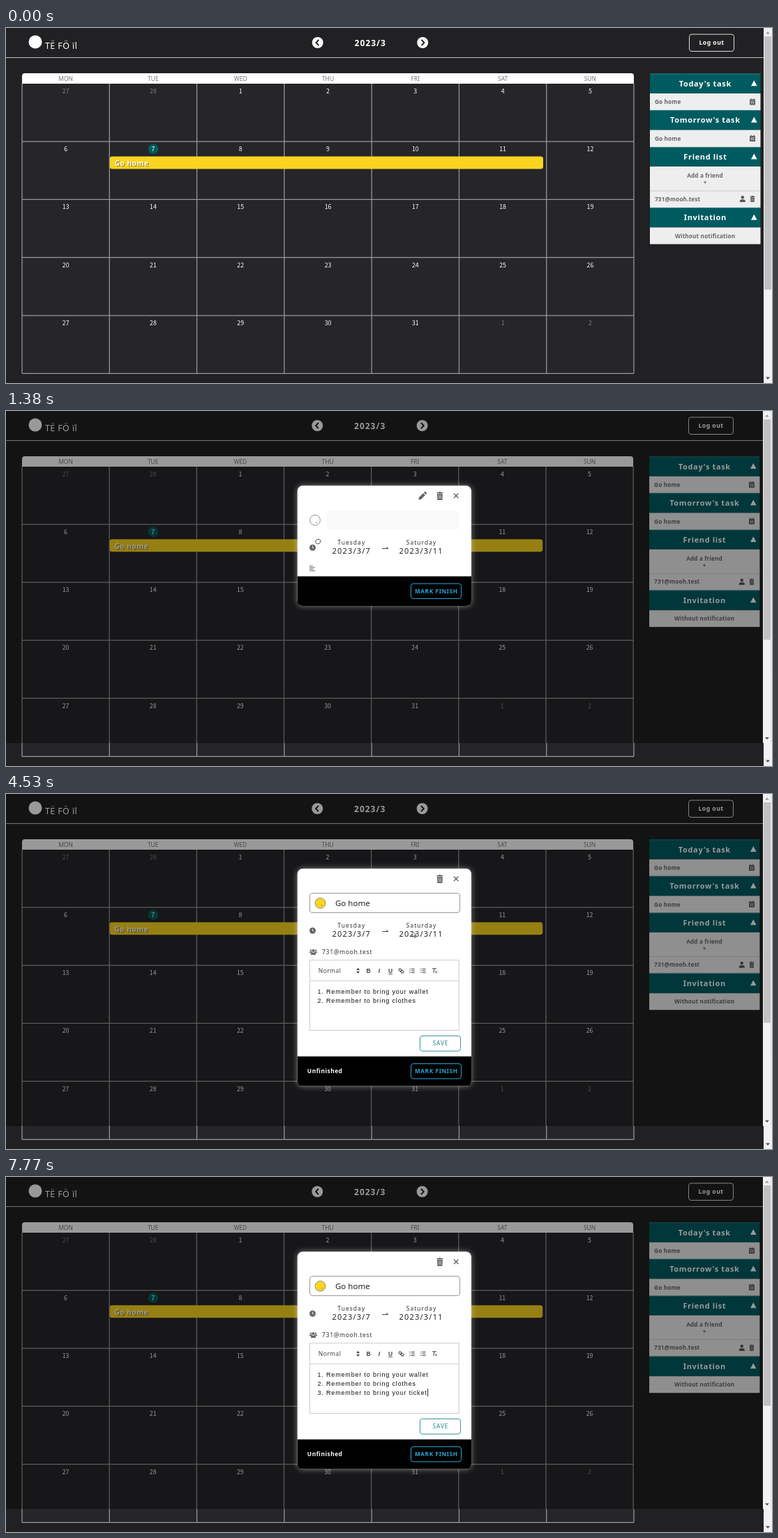
These frames come from a looping animation (1098x510 px, 8 s). An HTML page:

```html
<!DOCTYPE html>
<html lang="en">
<head>
<meta charset="utf-8">
<title>Calendar</title>
<style>
html, body { margin: 0; width: 100%; height: 100%; overflow: hidden; background: #212022; }
svg { display: block; width: 100vw; height: 100vh; font-family: "Noto Sans", sans-serif; }
.num { font-family: "Noto Sans CJK TC", "Noto Sans CJK JP", "Noto Sans", sans-serif; }
.arial { font-family: "Liberation Sans", Arial, sans-serif; }
.title { text-shadow: 1px 1px 1px #0007; }
.glow { filter: drop-shadow(0 0 4px #fbd41f) drop-shadow(0 0 3px #fbd41fa0); }
.dialog { filter: drop-shadow(0 0 4px #fff7); }
</style>
</head>
<body>
<svg id="stage" viewBox="0 0 1098 510" preserveAspectRatio="none" xmlns="http://www.w3.org/2000/svg"></svg>
<script>
const LOOP = 8000;
const MAIL = '731@mooh.test';
const stage = document.getElementById('stage');

const text = (x, y, s, size, fill, { w = 400, ls = 0, mid = false, cls = '', more = '' } = {}) =>
  `<text x="${x + (mid ? ls / 2 : 0)}" y="${y}" font-size="${size}" fill="${fill}" font-weight="${w}" letter-spacing="${ls}"` +
  `${mid ? ' text-anchor="middle"' : ''} class="${cls}" xml:space="preserve" ${more}>${s}</text>`;
const rect = (x, y, w, h, fill, rx = 0, more = '') =>
  `<rect x="${x}" y="${y}" width="${w}" height="${h}" fill="${fill}" rx="${rx}" ${more}/>`;
const circle = (x, y, r, fill, more = '') => `<circle cx="${x}" cy="${y}" r="${r}" fill="${fill}" ${more}/>`;
const path = (d, fill, more = '') => `<path d="${d}" fill="${fill}" ${more}/>`;
const line = (d, color, width = 1, more = '') => path(d, 'none', `stroke="${color}" stroke-width="${width}" ${more}`);
const box = (x, y, w, h, color, rx, fill = 'none', more = '') =>
  rect(x, y, w, h, fill, rx, `stroke="${color}" ${more}`);
const at = (x, y, s, body) => `<g transform="translate(${x} ${y}) scale(${s})">${body}</g>`;

// Icons, centred on their position
const trash = (x, y, s, c) => at(x, y, s,
  rect(-4.5, -5, 9, 1.5, c) + rect(-1.7, -6, 3.4, 1.5, c) + path('M-4 -2.8H4L3.5 6H-3.5Z', c) +
  line('M-1.7 -1V4.3M0 -1V4.3M1.7 -1V4.3', '#eee', .6));
const person = (x, y, s, c) => at(x, y, s, circle(0, -2.2, 2.2, c) + path('M-4 4.5V3Q-4 .8 0 .8T4 3V4.5Z', c));
const datebook = (x, y) => at(x, y, 1,
  rect(-4, -3.6, 8, 8, '#555', 1) + line('M-2 -4.8V-3M2 -4.8V-3', '#555', 1.2) +
  line('M-3.5 -1.3H3.5M-3.2 1.2H3.2M-1.2 -.5V3.6M1.2 -.5V3.6', '#eee', .6));
const rows = (x, y, c) => line(`M${x - 4} ${y - 3.2}h5m-5 2.2h8m-8 2.2h5m-5 2.2h8`, c, 1);

function scrollbar(height, thumbEnd) {
  return rect(1086, 0, 12, height, '#f1f1f1') + rect(1087, 12, 10, thumbEnd - 12, '#c1c1c1') +
    path('M1089 8.5h6l-3 -3.4Z', '#a0a0a0') + path(`M1089 ${height - 8.4}h6l-3 3.4Z`, '#505050');
}

const eventBar = (fill, cls = '') => rect(148.7, 184.5, 621.3, 18, fill, 3.5, `class="${cls}"`) +
  text(155.7, 198, 'Go home', 10, '#fff', { w: 600, ls: .6, cls: 'title' });

function header() {
  const nav = (x, d) => circle(x, 21, 8, '#fff') +
    line(`M${x + d * -1.6} 17l${d * 3.8} 4l${d * -3.8} 4`, '#212022', 1.9);
  return circle(42, 20, 9.5, '#fff') +
    text(56, 29.5, 'TË FÖ ïl', 12.5, '#fff', { w: 300, ls: .4 }) +
    nav(446.7, -1) + nav(597.2, 1) +
    text(521.7, 26, '2023/3', 12, '#fff', { w: 800, ls: 1, mid: true }) +
    box(979.5, 9, 64, 24.5, '#ddd', 3.5) +
    text(1011.3, 24.3, 'Log out', 8.7, '#fff', { w: 600, ls: .45, mid: true }) +
    line('M0 42.5H1086', '#c4c4c4');
}

function calendar() {
  const colW = 125.29, rowH = 83.3, left = 23, top = 79.8;
  let out = rect(left, top, colW * 7, rowH * 5, '#262528');
  let grid = '';
  for (let c = 0; c <= 7; c++) grid += `M${left + c * colW} ${top}v${rowH * 5}`;
  for (let r = 1; r <= 5; r++) grid += `M${left} ${top + r * rowH}h${colW * 7}`;
  out += line(grid, '#999', 1.25) + path('M23 80V69q0 -4 4 -4H896q4 0 4 4V80Z', '#fff');
  ['MON', 'TUE', 'WED', 'THU', 'FRI', 'SAT', 'SUN'].forEach((day, c) => {
    out += text(left + (c + .5) * colW, 75.6, day, 8.5, '#777', { mid: true });
  });
  out += circle(211, 173.8, 7.4, '#045a5d');
  for (let i = 0; i < 35; i++) {
    const n = i - 1, inMonth = n >= 1 && n <= 31;
    const label = n < 1 ? 28 + n : n > 31 ? n - 31 : n;
    out += text(left + (i % 7 + .5) * colW, 93.8 + Math.floor(i / 7) * rowH, label, 8.8,
      inMonth ? '#fff' : '#7c7c7c', { w: inMonth ? 500 : 400, mid: true, cls: 'num' });
  }
  return out + eventBar('#fad420');
}

function sidebar() {
  const x = 923, w = 158.5, mid = 1002;
  const head = (y, h, s) => rect(x, y, w, h, '#005b60') + line(`M${x} ${y + .4}h${w}`, '#2f8488', .8) +
    text(mid, y + h / 2 + 4, s, 11, '#fff', { w: 600, ls: .65, mid: true }) +
    path(`M1068 ${y + h / 2 + 3.4}h8.6l-4.3 -8Z`, '#fff');
  const item = (y, h) => rect(x, y, w, h, '#eee');
  const label = (lx, y, s, center) => text(lx, y, s, 8.2, '#666', { w: 600, ls: .15, mid: center });
  const task = y => item(y, 24.5) + label(930, y + 15.3, 'Go home') + datebook(1070, y + 12);
  return head(65.5, 28.5, "Today's task") + task(94) +
    head(118, 28.5, "Tomorrow's task") + task(146.5) +
    head(171, 28, 'Friend list') + item(199, 59) +
    label(mid, 214.8, 'Add a friend', true) + label(mid, 224.8, '+', true) +
    line(`M${x} 234h${w}`, '#ccc') + label(930, 248.5, MAIL) +
    person(1055.8, 245.5, 1, '#555') + trash(1070, 245.5, .75, '#555') +
    head(258, 28.5, 'Invitation') + item(286.5, 24) + label(mid, 301.8, 'Without notification', true);
}

// A dialog whose black footer starts at `foot`
function dialog(foot, body, { pencil = true, status = true } = {}) {
  const x = 417.7, right = 667, top = 107.3, bottom = foot + 42.6;
  const dark = { w: 400, ls: 1.1 };
  return rect(x, top, right - x, bottom - top, '#fff', 7.5, 'class="dialog"') +
    path(`M${x} ${foot}H${right}V${bottom - 7.5}q0 7.5 -7.5 7.5H${x + 7.5}q-7.5 0 -7.5 -7.5Z`, '#000') +
    (pencil ? path('M591.3 127.6l.7 -3.6 6 -6 2.9 2.9 -6 6ZM598.8 117.2l1.2 -1.2q.8 -.6 1.6 .2l1.2 1.2q.7 .8 0 1.5l-1.2 1.2Z', '#666') : '') +
    trash(621.9, 122, 1, '#666') + line('M642 118.6l6.4 6.4m0 -6.4l-6.4 6.4', '#666', 1.4) +
    circle(439.5, 196.2, 4.5, '#666') + line('M439.5 193.6v2.8l1.8 1', '#fff', .9) +
    text(475.3, 192.4, 'Tuesday', 8.4, '#333', dark) +
    text(467.5, 205, '2023/3/7', 11, '#222', { ls: 1.2 }) +
    text(573.7, 192.4, 'Saturday', 8.4, '#333', dark) +
    text(563.6, 205, '2023/3/11', 11, '#222', { ls: 1.2 }) +
    line('M539.3 197.6h8.6l-2.6 -2', '#333', 1) + body +
    (status ? text(431.8, foot + 24.4, 'Unfinished', 8.4, '#fff', { w: 600, ls: .5 }) : '') +
    box(580.5, foot + 10.5, 72, 21.5, '#2ba5d3', 3.5) +
    text(616.5, foot + 24.4, 'MARK FINISH', 8.2, '#2ba5d3', { w: 600, ls: .65, mid: true });
}

const swatch = (x, fill) => circle(x, 156.8, 7.4, fill, 'stroke="#777" stroke-width=".8"') +
  circle(x + 2, 160, .7, '#666');
const guests = person(440.5, 227, .9, '#666') + person(437, 225.8, .55, '#666') + person(444, 225.8, .55, '#666') +
  text(453, 229.6, MAIL, 8.6, '#333', { ls: .65 });
const field = rect(459, 143, 191.5, 27.5, '#f9f9f9', 8);

function loadingView() {
  return dialog(237.5, swatch(443, '#fff') + field + rows(439, 226, '#666'), { status: false });
}

function detailView() {
  const note = (y, s) => text(453, y, s, 8.6, '#333', { ls: .7 });
  return dialog(306.3, swatch(443, '#fad420') + field +
    text(465, 161, 'Go home', 11.5, '#222') + guests + rows(439, 267.2, '#666') +
    note(251.8, '1. Remember to bring your wallet') + note(270, '2. Remember to bring clothes'));
}

function editView() {
  const ink = '#444';
  const note = (y, n, s, id = ['', '']) =>
    text(446.5, y, n, 9, '#111', { ls: .83, cls: 'arial', more: id[0] }) +
    text(459, y, s, 9, '#111', { ls: .83, cls: 'arial', more: id[1] });
  const glyph = (x, s, more) => text(x, 257, s, 8.5, ink, { w: 700, mid: true, cls: 'arial', more });
  const listIcon = x => line(`M${x - 1.2} 251.4h5m-5 2.6h5m-5 2.6h5`, ink, 1) +
    line(`M${x - 3.6} 251.4h1.3m-1.3 2.6h1.3m-1.3 2.6h1.3`, ink, 1);
  const toolbar = text(447.8, 256.5, 'Normal', 8.5, ink, { ls: .4 }) +
    path('M502.2 253h4.8l-2.4 -3.2ZM502.2 254.8h4.8l-2.4 3.2Z', ink) +
    glyph(519.5, 'B') + glyph(535, 'I', 'font-style="italic" font-family="serif"') +
    glyph(551, 'U', 'text-decoration="underline"') +
    at(566.5, 254, 1, `<g transform="rotate(40)">${box(-4, -1.5, 4.4, 3, ink, 1.5) + box(-.4, -1.5, 4.4, 3, ink, 1.5)}</g>`) +
    listIcon(582) + listIcon(597.8) +
    line('M611 250.8h6m-3 0l-1.2 6.2m2.4 -2.6l2.6 2.6m0 -2.6l-2.6 2.6', ink, 1);
  return dialog(377, swatch(450.5, '#fad420') +
    box(435.5, 142.5, 215, 28, '#999', 3.5, 'none', 'id="titleBorder"') +
    text(472, 161, 'Go home', 11.5, '#222') + guests +
    box(435.5, 238.7, 213.7, 100.8, '#ccc', 0) + line('M435.5 268.2h213.7', '#ccc') + toolbar +
    note(286.8, '1.', 'Remember to bring your wallet') + note(300, '2.', 'Remember to bring clothes') +
    note(313.2, '', 'Remember to bring your ticket', ['id="marker"', 'id="ticket"']) +
    rect(0, 0, .9, 11, '#111', 0, 'id="caret"') +
    box(593.5, 347.5, 58, 21.8, '#3693a2', 3.5) +
    text(622.5, 361.4, 'SAVE', 8.2, '#24808c', { w: 500, ls: .9, mid: true }), { pencil: false });
}

const outline = 'stroke="#333" stroke-width=".8" stroke-linejoin="round"';
const cursors = {
  arrow: path('M.3 .3V9L2.2 7.2 3.5 10.2 4.8 9.6 3.5 6.7H6Z', '#fff', outline),
  hand: path('M3 7V1.2q.9 -1.4 1.8 0V5q3.8 .2 4 1.6V9.4q-.3 1.4 -1 3.2H3.6Q2.4 10.6 .6 8 1 6.6 3 8Z', '#fff', outline),
  busy: `<ellipse rx="3.7" ry="3.2" fill="#fff" ${outline} transform="rotate(-35)"/>`,
  beam: line('M-1.5 -5h3M-1.5 5h3M0 -5V5', '#333', .9)
};

stage.innerHTML = `
  <defs>
    <clipPath id="view"><rect width="1098" height="477"/></clipPath>
    <g id="page">${rect(0, 0, 1098, 510, '#212022') + header() + calendar() + sidebar()}</g>
  </defs>
  <use href="#page"/>${scrollbar(510, 376)}
  <g id="live" clip-path="url(#view)">
    <g transform="scale(.999)"><use href="#page"/><g id="hover">${eventBar('#fcd62b', 'glow')}</g>${scrollbar(477.5, 329)}</g>
    ${rect(0, 0, 1085, 477, '#000', 0, 'id="shade" opacity=".4"')}
  </g>
  <g id="loading">${loadingView()}</g><g id="detail">${detailView()}</g><g id="edit">${editView()}</g>
  ${Object.entries(cursors).map(([k, v]) => `<g id="${k}">${v}</g>`).join('')}`;

// start, shape, x, y, then optionally: end of move, x, y
const moves = [
  [180, 'arrow', 640, 330, 640, 448, 188],
  [1040, 'hand', 445.5, 187.3],
  [1380, 'busy', 447.3, 187.5],
  [1600, 'arrow', 449, 189, 2140, 608, 147],
  [2210, 'arrow', 608, 147, 2370, 598, 137],
  [2620, 'arrow', 598, 137],
  [2700, 'hand', 592, 127.3],
  [3330, 'arrow', 597, 128, 3730, 614, 190],
  [4050, 'beam', 586, 297],
  [4530, 'arrow', 582, 196.5],
  [6550, 'none', 0, 0]
];
// start, x, y, shown
const carets = [
  [0, 0, 0, false], [4600, 587.5, 291.2, true], [5160, 446.5, 304.2, true], [5580, 446.5, 304.2, false],
  [5820, 452.6, 304.2, true], [6140, 455.7, 304.2, true], [6640, 455.7, 304.2, false],
  [7130, 455.7, 304.2, true], [7700, 604.2, 304.2, true]
];

const el = id => document.getElementById(id);
const show = (id, on) => { el(id).style.display = on ? '' : 'none'; };
const ramp = (t, a, b) => Math.min(1, Math.max(0, (t - a) / (b - a)));
const latest = (list, t) => list.filter(k => k[0] <= t).pop();

function render(t) {
  show('live', t >= 110);
  show('hover', t >= 400 && t < 1380);
  el('hover').setAttribute('opacity', ramp(t, 400, 720));
  show('shade', t >= 1380);
  show('loading', t >= 1380 && t < 1600);
  show('detail', t >= 1600 && t < 3260);
  show('edit', t >= 3260);
  el('titleBorder').setAttribute('opacity', ramp(t, 3260, 3660));

  el('marker').textContent = t < 5820 ? '' : t < 6140 ? '3' : '3.';
  show('ticket', t >= 7700);
  const [, cx, cy, blink] = latest(carets, t);
  show('caret', blink);
  el('caret').setAttribute('transform', `translate(${cx} ${cy})`);

  const move = latest(moves, t);
  for (const shape in cursors) show(shape, move && move[1] === shape);
  if (move && cursors[move[1]]) {
    const [start, shape, x, y, end = start + 1, x2 = x, y2 = y] = move;
    const p = ramp(t, start, end);
    el(shape).setAttribute('transform', `translate(${x + (x2 - x) * p} ${y + (y2 - y) * p})`);
  }
}

const begin = performance.now();
function tick() {
  render((performance.now() - begin) % LOOP);
  requestAnimationFrame(tick);
}
tick();
</script>
</body>
</html>
```
